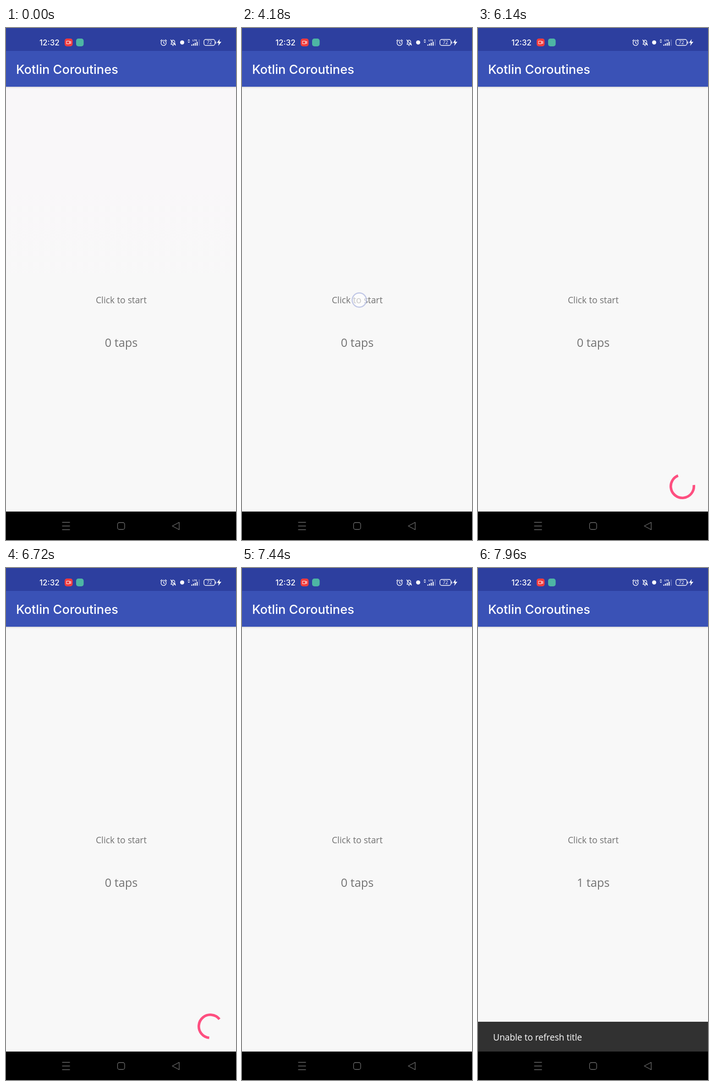
An HTML page for the animation above (8000 ms loop, 502 px wide and 1116 px high).

```html
<!DOCTYPE html>
<html lang="en">
<head>
<meta charset="utf-8">
<title>Kotlin Coroutines</title>
<style>
  html, body { margin: 0; width: 100%; height: 100%; overflow: hidden; background: #f8f8f8; }
  svg { display: block; width: 100%; height: 100%; }
  text { font-family: "Open Sans", "Noto Sans", sans-serif; fill: #fff; }
  .strong { font-family: Inter, "Open Sans", sans-serif; font-weight: 500; }
  .body { fill: #727272; text-anchor: middle; }
  .line { fill: none; stroke: #fff; stroke-width: 1.4; stroke-linecap: round; stroke-linejoin: round; }
  .nav { fill: none; stroke: #707070; stroke-width: 1.3; stroke-linejoin: round; }
</style>
</head>
<body>
<svg viewBox="0 0 502 1116">
  <defs>
    <linearGradient id="shade" x2="0" y2="1">
      <stop stop-color="#000" stop-opacity=".12"/>
      <stop offset="1" stop-color="#000" stop-opacity="0"/>
    </linearGradient>
    <linearGradient id="warm" x2="0" y2="1">
      <stop offset=".4" stop-color="#f9f7f9"/>
      <stop offset="1" stop-color="#f8f8f8"/>
    </linearGradient>
  </defs>

  <rect width="502" height="1116" fill="#f8f8f8"/>
  <rect id="tint" y="128" width="502" height="460" fill="url(#warm)"/>
  <rect y="128" width="502" height="4" fill="url(#shade)"/>
  <rect width="502" height="128" fill="#3a52b6"/>
  <rect width="502" height="50" fill="#2d3f9f"/>
  <text class="strong" x="22" y="100" font-size="27.2">Kotlin Coroutines</text>

  <!-- status bar -->
  <text class="strong" x="73" y="37.5" font-size="17">12:32</text>
  <rect x="128" y="23" width="17.5" height="17" rx="5" fill="#f13c3e"/>
  <rect x="153" y="23" width="16.5" height="17" rx="5" fill="#4db6a4"/>
  <g class="line">
    <path d="M132.5 28.5h6v6h-6zM138.5 31l3-2v5l-3-2" stroke-width="1"/>
    <circle cx="344" cy="32.5" r="5.6"/>
    <path d="M344 29.5v3.2l2 1.3M337.5 28l2.5-2.5M350.5 28l-2.5-2.5"/>
    <path d="M360 35.5h9.500l-1.300-2v-3.500a3.500 3.500 0 0 0-7 0v3.500zM363.500 38h2M359.500 26l10.500 11.500"/>
    <path d="M397.500 27l1.500-1.500 1.500 1.500M397.500 30l1.500 1.500 1.500-1.500" stroke-width="1.200"/>
    <rect x="432" y="25" width="24" height="13" rx="4"/>
    <path d="M458 30v3.500"/>
  </g>
  <circle cx="384.500" cy="31.500" r="4.500" fill="#fff"/>
  <path d="M404.500 36h2.200v2.500h-2.200zM408.300 34h2.200v4.500h-2.200zM412.100 32h2.200v6.500h-2.200zM416 30h2.200v8.500h-2.200z" fill="#fff"/>
  <rect x="420.500" y="25" width="2.200" height="13.500" fill="#fff" opacity=".25"/>
  <text x="407" y="28.500" font-size="6" font-weight="700">LTE</text>
  <text x="444" y="35.300" font-size="10" text-anchor="middle">72</text>
  <path d="M466.500 24l-6 8.500h4l-1.500 6.500 7-9h-4.500z" fill="#fff"/>

  <!-- content -->
  <text class="body" x="251.500" y="599.500" font-size="19.300">Click to start</text>
  <text class="body" id="taps" x="251.500" y="695" font-size="25.300">0 taps</text>
  <circle id="touch" cx="256" cy="593" r="15.500" fill="#fff" fill-opacity=".6" stroke="#c0c7e6" stroke-width="2.400"/>
  <circle id="ring" cx="446" cy="999" r="25.200" pathLength="1" fill="none" stroke="#fe4f80" stroke-width="5.600"/>
  <g id="snack">
    <rect width="502" height="70" fill="#313131"/>
    <text id="message" x="33" y="41" font-size="19.100">Unable to refresh title</text>
  </g>

  <!-- navigation bar -->
  <rect y="1054" width="502" height="62"/>
  <g class="nav">
    <path d="M122.500 1077.500h17M122.500 1085.500h17M122.500 1093.500h17M363 1085.500l15-8v16z"/>
    <rect x="243.500" y="1078" width="15.500" height="15" rx="4"/>
  </g>
</svg>

<script>
const LOOP = 8000, SLOW = 1.73;
const SPIN = [5320, 7160], TOUCH = [4180, 5040], SNACK = 7455, COUNT = 7800;

const el = id => document.getElementById(id);
const [tint, taps, touch, ring, snack, message] =
  ["tint", "taps", "touch", "ring", "snack", "message"].map(el);
const clamp = x => Math.min(1, Math.max(0, x));
const within = (t, [from, to]) => t >= from && t < to;
const show = (node, on) => node.setAttribute("visibility", on ? "visible" : "hidden");

// cubic easing from (0,0) to (endX,1) with control points (x1,0) and (x2,1)
function ease(x, x1, x2, endX = 1) {
  if (x <= 0) return 0;
  if (x >= endX) return 1;
  let lo = 0, hi = 1, s;
  for (let i = 0; i < 24; i++) {
    s = (lo + hi) / 2;
    const r = 1 - s;
    if (3 * r * r * s * x1 + 3 * r * s * s * x2 + s ** 3 * endX < x) lo = s; else hi = s;
  }
  return s * s * (3 - 2 * s);
}

function drawRing(ms) {
  const p = ms / 1333 % 1;
  const head = .75 * ease(p, .2, .1, .5);
  const tail = .75 * ease(p - .5, .2, .1, .5);
  const angle = -90 + 360 * (tail + .25 * p) + ms * 720 / 6666;
  ring.setAttribute("stroke-dasharray", `${head - tail} 2`);
  ring.setAttribute("transform", `rotate(${angle} 446 999)`);
}

function draw(t) {
  tint.setAttribute("opacity", 1 - clamp((t - 120) / 140));

  show(touch, within(t, TOUCH));
  touch.setAttribute("opacity", clamp((TOUCH[1] - t) / 370));

  show(ring, within(t, SPIN) && t > SPIN[0]);
  drawRing(Math.max(0, t - SPIN[0]) / SLOW);

  const ms = (t - SNACK) / SLOW;
  show(snack, ms > 0);
  snack.setAttribute("transform", `translate(0 ${1055 - 66 * ease(ms / 250, .4, .2)})`);
  message.setAttribute("opacity", clamp((ms - 70) / 180));

  taps.textContent = `${t < COUNT ? 0 : 1} taps`;
}

const start = performance.now();
function tick() {
  draw((performance.now() - start) % LOOP);
  requestAnimationFrame(tick);
}
tick();
</script>
</body>
</html>
```
